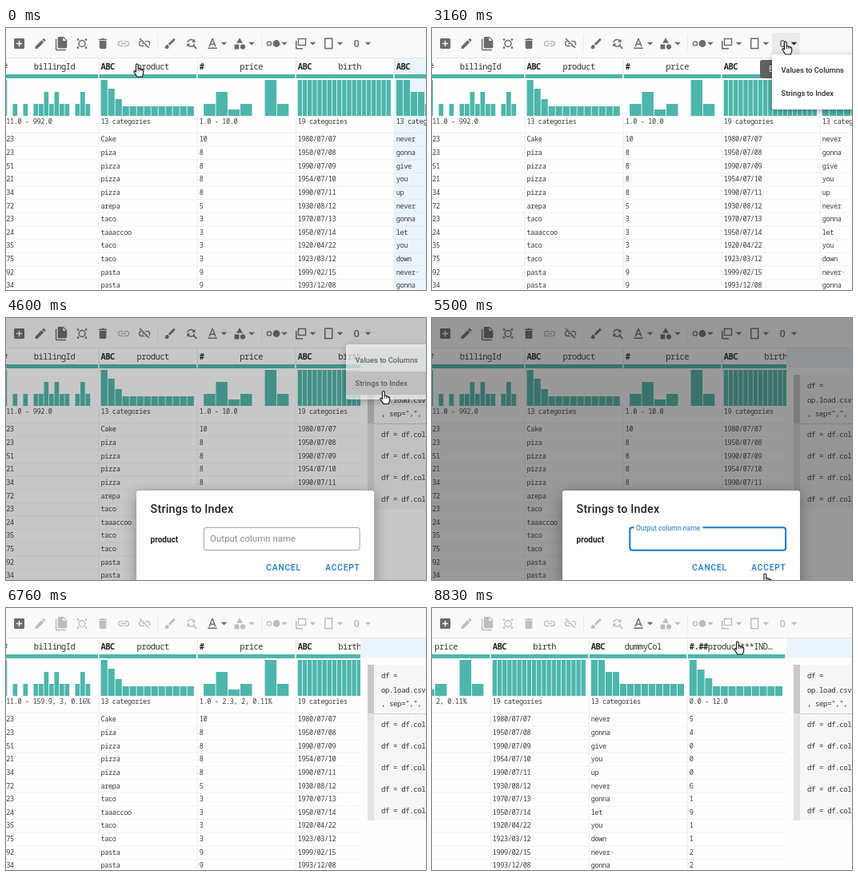
An HTML page with a canvas for the animation above (9.33 s loop, 525 by 328 pixels).

```html
<!DOCTYPE html>
<html lang="en">
<head>
<meta charset="utf-8">
<title>Strings to Index</title>
<style>
  html, body { margin: 0; width: 100%; height: 100%; overflow: hidden; background: #fefefe; }
  canvas { display: block; width: 525px; height: 328px; }
</style>
</head>
<body>
<canvas id="stage" width="525" height="328"></canvas>
<script>
const W = 525, H = 328, LOOP = 9330;
const ctx = document.getElementById('stage').getContext('2d');
const MONO = '"Noto Sans Mono", "DejaVu Sans Mono", monospace';
const SANS = 'Roboto, Arial, sans-serif';
const TEAL = '#4db6ac', BLUE = '#1976d2', TINT = '#eaf4fb', DARK = '#6b6b6b', PALE = '#bdbdbd';

const COL_W = 123.07, COL_0 = -7.5, SCROLL = 289, PANEL_X = 443;
const fill = (n, h) => Array(n).fill(h);
const columns = [
  { name: 'billingId', type: '#', stat: '111.0 - 992.0', after: '111.0 - 159.9, 3, 0.16%',
    bars: [45, 0, 15, 0, 15, 0, 15, 15, 30, 15, 30, 15, 15, 0, 15, 30, 15, 0],
    cells: '123 123 151 121 134 872 723 124 135 875 992 134' },
  { name: 'product', type: 'ABC', stat: '13 categories',
    bars: [45, 34, 21, ...fill(10, 12)],
    cells: 'Cake piza pizza pizza pizza arepa taco taaaccoo taco taco pasta pasta' },
  { name: 'price', type: '#', stat: '1.0 - 10.0', after: '1.0 - 2.3, 2, 0.11%',
    bars: [15, 30, 8, 15, 0, 45, 15], inset: 8.5, span: 107,
    cells: '10 8 8 8 8 5 3 3 3 3 9 9' },
  { name: 'birth', type: 'ABC', stat: '19 categories', bars: fill(19, 45),
    cells: '1980/07/07 1950/07/08 1990/07/09 1954/07/10 1990/07/11 1930/08/12 ' +
           '1970/07/13 1950/07/14 1920/04/22 1923/03/12 1999/02/15 1993/12/08' },
  { name: 'dummyCol', type: 'ABC', stat: '13 categories',
    bars: [45, 45, 30, 30, ...fill(9, 15)],
    cells: 'never gonna give you up never gonna let you down never· gonna' },
  { name: 'product***IND…', type: '#.##', stat: '0.0 - 12.0', after: '0.0 - 1.0, 4, 0.21%', left: true,
    bars: [45, 33, 22, ...fill(9, 12)],
    cells: '5 4 0 0 0 6 1 9 1 1 2 2' }
];

const LINK = 'M3.9,12C3.9,10.29 5.29,8.9 7,8.9H11V7H7A5,5 0 0,0 2,12A5,5 0 0,0 7,17H11V15.1H7C5.29,15.1 3.9,13.71 3.9,12M8,13H16V11H8V13M17,7H13V8.9H17C18.71,8.9 20.1,10.29 20.1,12C20.1,13.71 18.71,15.1 17,15.1H13V17H17A5,5 0 0,0 22,12A5,5 0 0,0 17,7Z';
const icons = [
  [16.5, 'M17,13H13V17H11V13H7V11H11V7H13V11H17M19,3H5C3.89,3 3,3.89 3,5V19A2,2 0 0,0 5,21H19A2,2 0 0,0 21,19V5C21,3.89 20.1,3 19,3Z', 'keep'],
  [43, 'M20.71,7.04C21.1,6.65 21.1,6 20.71,5.63L18.37,3.29C18,2.9 17.35,2.9 16.96,3.29L15.12,5.12L18.87,8.87M3,17.25V21H6.75L17.81,9.93L14.06,6.18L3,17.25Z'],
  [69, 'M15,7H20.5L15,1.5V7M8,0H16L22,6V18A2,2 0 0,1 20,20H8C6.89,20 6,19.1 6,18V2A2,2 0 0,1 8,0M4,4V22H20V24H4A2,2 0 0,1 2,22V4H4Z'],
  [121, 'M19,4H15.5L14.5,3H9.5L8.5,4H5V6H19M6,19A2,2 0 0,0 8,21H16A2,2 0 0,0 18,19V7H6V19Z'],
  [147, LINK, 'pale'],
  [173, LINK],
  [205, 'M20.71,4.63L19.37,3.29C19,2.9 18.35,2.9 17.96,3.29L9,12.25L11.75,15L20.71,6.04C21.1,5.65 21.1,5 20.71,4.63M7,14A3,3 0 0,0 4,17C4,18.31 2.84,19 2,19C2.92,20.22 4.5,21 6,21A4,4 0 0,0 10,17A3,3 0 0,0 7,14Z'],
  [232, 'M11,6C12.38,6 13.63,6.56 14.54,7.46L12,10H18V4L15.95,6.05C14.68,4.78 12.93,4 11,4C7.47,4 4.57,6.61 4.08,10H6.1C6.56,7.72 8.58,6 11,6M16.64,15.14C17.3,14.24 17.76,13.17 17.92,12H15.9C15.44,14.28 13.42,16 11,16C9.62,16 8.37,15.44 7.46,14.54L10,12H4V18L6.05,15.95C7.32,17.22 9.07,18 11,18C12.55,18 13.98,17.5 15.14,16.64L20,21.5L21.5,20L16.64,15.14Z'],
  [258, 'M9.62,12L12,5.67L14.37,12M11,3L5.5,17H7.75L8.87,14H15.12L16.25,17H18.5L13,3H11ZM4,19H20V21H4Z', 'keep'],
  [292, 'M11,13.5V21.5H3V13.5H11M12,2L17.5,11H6.5L12,2M17.5,13C20,13 22,15 22,17.5C22,20 20,22 17.5,22C15,22 13,20 13,17.5C13,15 15,13 17.5,13Z']
].map(([x, d, mode]) => ({ x, mode, path: new Path2D(d) }));
const HAND = new Path2D('M-1.5,1.2C-1.5,-.4 1.3,-.4 1.3,1.2V6C1.8,5.1 3.6,5.3 3.7,6.6C4.3,5.9 5.8,6.2 5.9,7.4C6.5,6.9 7.7,7.2 7.7,8.5V11.5C7.7,13 6.6,13.8 6.4,16H-.4C-.8,14 -2.8,12.4 -4,10.2C-4.6,9 -3.3,8.2 -2.5,9L-1.5,10Z');

const ramp = (t, a, b) => Math.max(0, Math.min(1, (t - a) / (b - a)));
const ease = (t, a, b) => { const u = ramp(t, a, b); return u * u * (3 - 2 * u); };
const mix = (a, b, u) => a + (b - a) * u;

function rect(x, y, w, h, color) {
  ctx.fillStyle = color;
  ctx.fillRect(x, y, w, h);
}
function text(s, x, y, font, color, spacing = 0) {
  ctx.font = font;
  ctx.letterSpacing = spacing + 'px';
  ctx.fillStyle = color;
  ctx.fillText(s, x, y);
}
function card(x, y, w, h, r, blur) {
  ctx.save();
  ctx.shadowColor = 'rgba(0,0,0,.35)';
  ctx.shadowBlur = blur;
  ctx.shadowOffsetY = blur / 4;
  ctx.fillStyle = '#fff';
  ctx.beginPath();
  ctx.roundRect(x, y, w, h, r);
  ctx.fill();
  ctx.restore();
}
function faded(alpha, draw) {
  if (alpha <= 0) return;
  ctx.save();
  ctx.globalAlpha = alpha;
  draw();
  ctx.restore();
}
function disc(x, y, r, color, line) {
  ctx.beginPath();
  ctx.arc(x, y, r, 0, 7);
  if (line) { ctx.lineWidth = line; ctx.strokeStyle = color; ctx.stroke(); }
  else { ctx.fillStyle = color; ctx.fill(); }
}
function box(x, y, w, h, color, line) {
  ctx.lineWidth = line;
  ctx.strokeStyle = color;
  ctx.strokeRect(x, y, w, h);
}
function caret(x, color) {
  ctx.fillStyle = color;
  ctx.beginPath();
  ctx.moveTo(x - 3.8, 17.8);
  ctx.lineTo(x + 3.8, 17.8);
  ctx.lineTo(x, 21.6);
  ctx.fill();
}

function toolbar(t) {
  const base = t >= 6450 ? PALE : DARK;
  rect(0, 0, W, 37, '#fafafa');
  rect(0, 37, W, 1, '#e4e4e4');
  rect(189, 9, 1, 20, '#ececec');
  rect(319, 9, 1, 20, '#ececec');
  for (const { x, mode, path } of icons) {
    ctx.save();
    ctx.translate(x - 8.6, 10.9);
    ctx.scale(.72, .72);
    ctx.fillStyle = mode === 'keep' ? DARK : mode === 'pale' ? (base === PALE ? PALE : '#b4b4b4') : base;
    ctx.fill(path);
    ctx.restore();
  }
  for (const [color, w, shift] of [['#fafafa', 3.4, 1], [base, 1.4, 0]]) {
    ctx.strokeStyle = color;
    ctx.lineWidth = w;
    ctx.beginPath();
    ctx.moveTo(167 + shift, 13);
    ctx.lineTo(179 + shift, 25);
    ctx.stroke();
  }
  disc(95, 19.5, 4, base, 1.5);
  for (const sx of [-1, 1]) for (const sy of [-1, 1])
    rect(95 + sx * 5 - 1.2, 19.5 + sy * 5 - 1.2, 2.4, 2.4, base);
  disc(329, 19.5, 2.6, base, 1.4);
  disc(338, 19.5, 4.4, base);
  box(365.5, 13.5, 9, 8, base, 1.4);
  rect(362, 16, 1.5, 10, base);
  rect(362, 25, 9, 1.5, base);
  box(398.7, 13.2, 9, 12.4, base, 1.5);

  const hover = ease(t, 1480, 1560) * (1 - ease(t, 3240, 3500));
  faded(hover, () => rect(425, 6, 35, 27, '#ebebeb'));
  text('0', 434.5, 24, '500 13px ' + SANS, base);
  caret(272.5, DARK);
  for (const x of [307, 348, 383.5, 417.5]) caret(x, base);
  caret(452.5, t > 1560 && t < 4500 ? '#222' : base);
}

function column(c, x, t) {
  const end = x + COL_W;
  rect(x, 38, 1, 20, '#e6e6e6');
  rect(x, 110, 1, H, '#efefef');
  rect(x + 1, 58, COL_W - 1.6, 5, TEAL);

  const head = '10.4px ' + MONO;
  text(c.type, x + 3, 51.5, 'bold ' + head, '#222', -.5);
  ctx.font = head;
  ctx.letterSpacing = '-.5px';
  const nameX = c.left ? x + 26 : x + 68 - ctx.measureText(c.name).width / 2;
  text(c.name, nameX, 51.5, head, '#333', -.5);

  const step = (c.span || 117) / c.bars.length;
  c.bars.forEach((h, i) => rect(x + (c.inset || 3) + i * step, 110 - h, step - .8, h, TEAL));

  const longStat = c.after && t >= 6450 && !(c.left && t >= 8420);
  const small = '8.6px ' + MONO;
  text(longStat ? c.after : c.stat, x + 3, 120.3, small, '#3a3a3a', -.39);
  c.cells.split(' ').forEach((s, i) => text(s, x + 3, 142.3 + i * 16.64, small, '#3a3a3a', -.39));
  return end;
}

function table(t, right) {
  const scroll = SCROLL * ease(t, 7010, 7360);
  const selected = t < 460 ? 4 : t < 1100 ? 1 : -1;
  ctx.save();
  ctx.beginPath();
  ctx.rect(0, 38, right, H);
  ctx.clip();
  const left = i => COL_0 + i * COL_W - scroll;
  if (selected >= 0) rect(left(selected), 38, COL_W, H, TINT);
  for (let i = 0; i < 13; i++) rect(0, 131 + i * 16.64, right, 1, 'rgba(0,0,0,.05)');
  columns.forEach((c, i) => {
    const x = left(i);
    if ((i < 5 || t >= 6450) && x < right && x + COL_W > 0) column(c, x, t);
  });
  ctx.restore();
}

function panel(t, x) {
  if (x >= W) return;
  const lines = t >= 6300 ? 5 : 4;
  const font = '9px ' + MONO;
  ctx.save();
  ctx.translate(x - PANEL_X, 0);
  rect(443, 38, 90, H, '#fefefe');
  rect(443, 38, 90, 24, TINT);
  rect(452, 71, 80, 61 + lines * 26.8, '#f6f6f6');
  rect(452, 71, 8, 61 + lines * 26.8, '#e2e2e2');
  rect(452, 71, 8, 61, '#c8c8c8');
  for (let i = 0; i < 22; i++) rect(460 + i * 3, 132, 2, 1, '#bbb');
  ['df =', 'op.load.csv', ', sep=",",'].forEach((s, i) => text(s, 469, [87.5, 106, 122.5][i], font, '#333', -.37));
  for (let i = 0; i < lines; i++) text('df = df.cols', 469, 149 + i * 26.9, font, '#333', -.37);
  ctx.restore();
}

function tooltip(t) {
  faded(ease(t, 1600, 1720) * (1 - ease(t, 3190, 3400)), () => {
    ctx.fillStyle = '#616161';
    ctx.beginPath();
    ctx.roundRect(410, 40, 64, 23, 3);
    ctx.fill();
    text('Encoding', 421, 54.8, '10px ' + SANS, '#fff');
  });
}

function menu(t) {
  faded(ease(t, 1600, 1730) * (1 - ease(t, 4510, 4750)), () => {
    card(425, 33, 120, 69, 3, 9);
    faded(ease(t, 4200, 4330), () => rect(425, 67, 120, 29, '#bfbfbf'));
    const font = '500 9.36px ' + SANS;
    text('Values to Columns', 436.5, 55.6, font, '#2b2b2b');
    text('Strings to Index', 436.5, 84.6, font, '#2b2b2b');
  });
}

function field(t) {
  const u = ease(t, 4640, 4860);
  ctx.lineWidth = mix(1, 2, u);
  ctx.strokeStyle = u > .3 ? BLUE : '#9e9e9e';
  ctx.beginPath();
  ctx.roundRect(247.3, 262.3, 194.8, 28.4, 3);
  ctx.stroke();
  if (u > 0) rect(252.5, 260.5, 86 * u, 4, '#fff');
  text('Output column name', 255, mix(280.4, 265.6, u), mix(11.5, 8.65, u) + 'px ' + SANS, u > .3 ? BLUE : '#8a8a8a');
  if (t > 4860 && t < 5360) rect(255, 269.5, 1, 14, '#222');
}

function dialog(t) {
  const open = ease(t, 4370, 4490), shut = ease(t, 5960, 6150);
  faded(open * (1 - shut), () => {
    const s = mix(.92, 1, open);
    ctx.translate(311.5, 275);
    ctx.scale(s, s);
    ctx.translate(-311.5, -275);
    card(163, 216, 297, 122, 3, 18);
    text('Strings to Index', 180.6, 244.3, '500 14.4px ' + SANS, '#222', .18);
    text('product', 180.6, 281, 'bold 10px ' + SANS, '#222');
    field(t);
    faded(ramp(t, 5900, 5960) * .14, () => rect(389, 299, 64, 26, BLUE));
    const font = '500 10.08px ' + SANS;
    text('CANCEL', 325.3, 316, font, BLUE, .9);
    text('ACCEPT', 399.2, 316, font, BLUE, .9);
  });
}

const moves = [
  [1060, 164, 45], [1600, 442, 17], [3160, 442, 17], [3660, 473, 78], [4530, 473, 78], [5050, 452, 345],
  [5359, 409, 345], [5360, 409, 328], [5730, 432, 304], [6000, 432, 304], [6350, 425, 345],
  [8159, 402, 345], [8160, 402, 225], [8830, 382, 42]
];
function cursor(t) {
  const last = moves[moves.length - 1];
  let i = moves.findIndex(m => m[0] > t);
  let [, x, y] = i < 0 ? last : moves[0];
  if (i > 0) {
    const [t0, x0, y0] = moves[i - 1], [t1, x1, y1] = moves[i];
    const u = ease(t, t0, t1);
    x = mix(x0, x1, u);
    y = mix(y0, y1, u);
  }
  ctx.save();
  ctx.translate(x, y);
  ctx.fillStyle = '#fff';
  ctx.strokeStyle = '#111';
  ctx.lineWidth = 1.1;
  ctx.lineJoin = 'round';
  ctx.fill(HAND);
  ctx.stroke(HAND);
  ctx.beginPath();
  for (const [fx, fy] of [[1.3, 6], [3.7, 6.8], [5.9, 7.6]]) {
    ctx.moveTo(fx, fy);
    ctx.lineTo(fx, 9.2);
  }
  ctx.lineWidth = .8;
  ctx.stroke();
  ctx.restore();
}

function draw(t) {
  rect(0, 0, W, H, '#fefefe');
  const edge = mix(W, PANEL_X, ease(t, 4220, 4470));
  table(t, edge);
  panel(t, edge);
  toolbar(t);
  tooltip(t);
  const dim = .46 * ease(t, 4420, 4760) * (1 - ease(t, 6000, 6400));
  rect(0, 0, W, H, `rgba(33,33,33,${dim})`);
  dialog(t);
  menu(t);
  cursor(t);
}

const start = performance.now();
function frame() {
  draw((performance.now() - start) % LOOP);
  requestAnimationFrame(frame);
}
frame();
</script>
</body>
</html>
```
